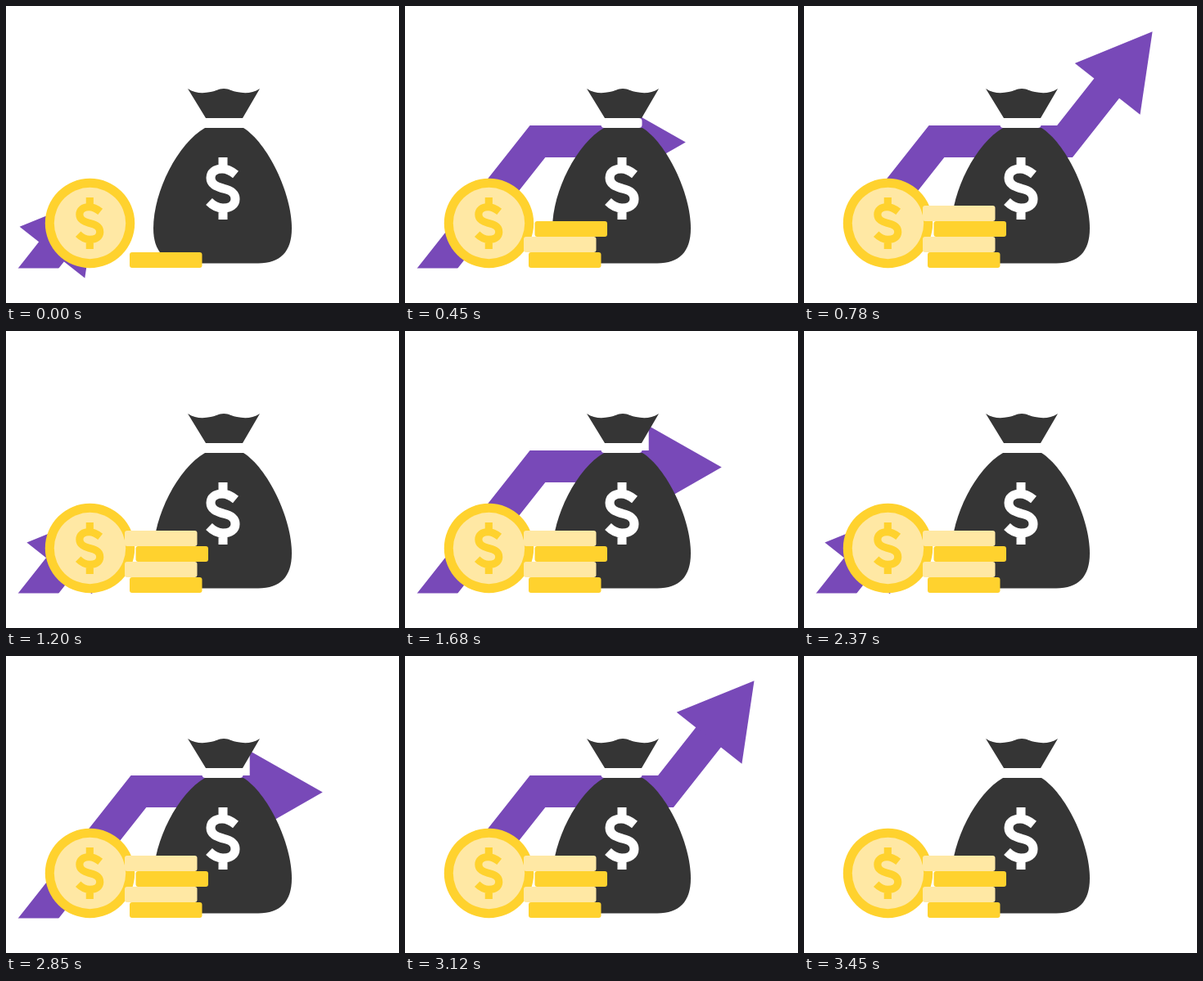
Recreate the animation shown at these times as an HTML page with a canvas. Size 480 px wide and 363 px high, loop 3.54 s.

```html
<!DOCTYPE html>
<html lang="en">
<head>
<meta charset="utf-8">
<title>Growing savings</title>
<style>
  html, body { margin: 0; width: 100%; height: 100%; overflow: hidden; background: #fff; }
  canvas { display: block; }
</style>
</head>
<body>
<canvas id="stage" width="480" height="363"></canvas>
<script>
const ctx = document.getElementById('stage').getContext('2d');
const LOOP = 3540, CYCLE = 1170, STEP = 30;
const PURPLE = '#7849b8', DARK = '#353535', YELLOW = '#ffd22e', LIGHT = '#ffe8a4';

const neck = new Path2D('M222 101C231 107 241 107 250 105C257 104 259 101 266 101C273 101 275 104 282 105C291 107 301 107 310 101L289 137H244Z');
const body = new Path2D('M243 149H290C319 167 349 228 349 272C349 300 335 314.5 308 314.5H221C194 314.5 180 300 180 272C180 226 210 168 243 149Z');
const dollar = new Path2D('M15.5 -17C10 -21.5 5 -24 -1 -24C-10 -24 -15 -19 -15 -13C-15 -4 -6 -2 0 0C9 2 15 5 15 13C15 20 9 24 0 24C-7 24 -12 21 -17 16M0 -38V-24M0 24V38');

// Arrow route: diagonal, level, diagonal; distances run along its centre line.
const SLOPE = -0.903, FIRST = 197, LEVEL = 156.5, END = 442;
const TURNS = [0, FIRST, FIRST + LEVEL];
const ANGLES = [SLOPE, 0, SLOPE];
const STARTS = [[40, 320], [162, 165.5], [318.5, 165.5]];

function pointAt(s) {
  const i = s < TURNS[1] ? 0 : s < TURNS[2] ? 1 : 2;
  const d = s - TURNS[i], angle = ANGLES[i];
  return { x: STARTS[i][0] + d * Math.cos(angle), y: STARTS[i][1] + d * Math.sin(angle), angle };
}

function ease(p) {
  return (1 - Math.cos(Math.PI * Math.min(1, Math.max(0, p)))) / 2;
}

function drawArrow(phase) {
  const front = END * ease((phase + 154) / 1008);
  const back = -30 + (END + 30) * ease((phase - 600) / 510);
  const head = pointAt(front), tail = pointAt(back);
  if (back < front) {
    ctx.save();
    ctx.beginPath();
    ctx.rect(0, 0, 480, 320.5);
    ctx.clip();
    ctx.beginPath();
    ctx.moveTo(tail.x, tail.y);
    TURNS.forEach((s, i) => {
      if (s > back && s < front) ctx.lineTo(...STARTS[i]);
    });
    ctx.lineTo(head.x + Math.cos(head.angle), head.y + Math.sin(head.angle));
    ctx.lineWidth = 39;
    ctx.strokeStyle = PURPLE;
    ctx.stroke();
    ctx.restore();
  }
  ctx.save();
  ctx.translate(head.x, head.y);
  ctx.rotate(head.angle);
  ctx.fillStyle = PURPLE;
  ctx.beginPath();
  ctx.moveTo(0, -49.5);
  ctx.lineTo(89, 1);
  ctx.lineTo(0, 52);
  ctx.fill();
  ctx.restore();
}

function drawDollar(x, y, scale, color) {
  ctx.save();
  ctx.translate(x, y);
  ctx.scale(scale, scale);
  ctx.lineWidth = 11;
  ctx.strokeStyle = color;
  ctx.stroke(dollar);
  ctx.restore();
}

function disc(r, color) {
  ctx.fillStyle = color;
  ctx.beginPath();
  ctx.arc(102.5, 265.5, r, 0, 7);
  ctx.fill();
}

function bar(x, y, w, h, r, color) {
  ctx.fillStyle = color;
  ctx.beginPath();
  ctx.roundRect(x, y, w, h, r);
  ctx.fill();
}

function render(t) {
  ctx.fillStyle = '#fff';
  ctx.fillRect(0, 0, 480, 363);

  // Repeat passes of the arrow run slightly ahead of the first one.
  const phase = t % CYCLE, lead = t < CYCLE ? 0 : 10;
  if (t < STEP || (phase >= STEP && phase < 1110)) drawArrow(phase + lead);

  ctx.fillStyle = DARK;
  ctx.fill(neck);
  ctx.fill(body);
  bar(239.5, 137, 50, 12, 4, '#fff');
  drawDollar(265, 223, 1, '#fff');

  disc(54.7, YELLOW);
  disc(43.7, LIGHT);
  drawDollar(102.3, 265.5, 0.83, YELLOW);

  const coins = Math.min(4, 1 + Math.floor(t / 180));
  [151, 145, 158.5, 145].slice(0, coins).forEach((x, i) =>
    bar(x, 301 - 19 * i, 88.5, 19, 3, i % 2 ? LIGHT : YELLOW));
}

function tick() {
  const t = performance.now() % LOOP;
  render(Math.floor(t / STEP) * STEP);
  requestAnimationFrame(tick);
}
tick();
</script>
</body>
</html>
```
